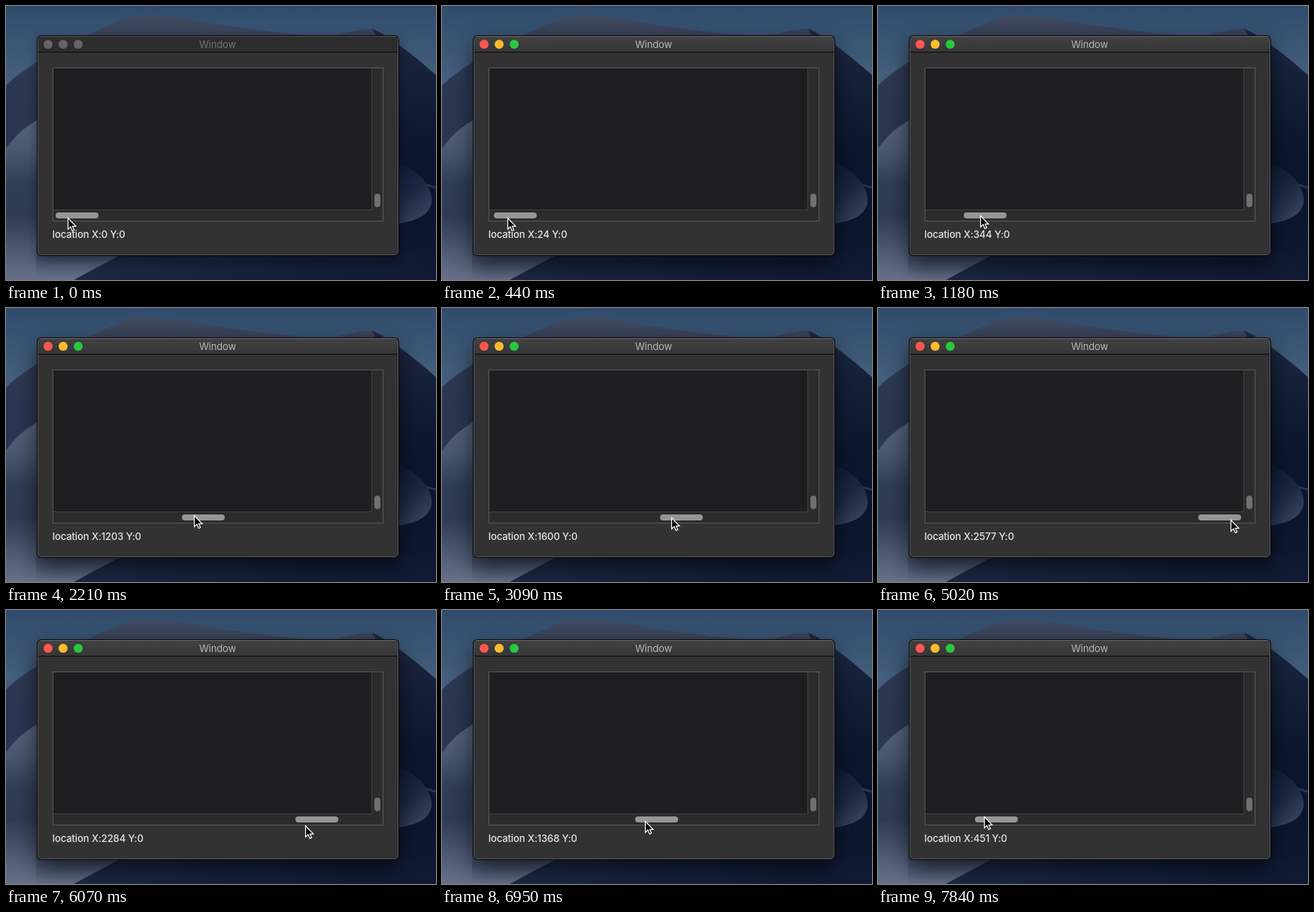
Write an HTML page with a canvas that moves like this. It is 572 px wide and 365 px high and loops after 7.99 s.

```html
<!DOCTYPE html>
<html lang="en">
<head>
<meta charset="utf-8">
<title>Scroll location</title>
<style>
html, body { margin: 0; width: 100%; height: 100%; overflow: hidden; background: #101a30; }
canvas { display: block; }
</style>
</head>
<body>
<canvas id="stage" width="572" height="365"></canvas>
<script>
const W = 572, H = 365, LOOP = 7990, STEP = 147.9;
const TRACK = 66, RATIO = 0.1397;
const ctx = document.getElementById('stage').getContext('2d');

// Drag poses, linear in between: step, scroll, cursor x, cursor y.
const poses = [
  [1, 0, 82, 282],
  [4, 36, 89, 282],
  [8, 344, 136, 279],
  [15, 1203, 250, 276],
  [26, 2076, 372, 283],
  [31, 2577, 450, 282],
  [36, 2577, 482, 282],
  [37, 2577, 482, 282],
  [41, 2284, 398, 287],
  [53, 451, 141, 275]
];

function poseAt(step) {
  const i = Math.max(1, poses.findIndex(p => step <= p[0]));
  const a = poses[i - 1], b = poses[i];
  const k = Math.max(0, (step - a[0]) / (b[0] - a[0]));
  return a.map((v, j) => Math.round(v + (b[j] - v) * k)).slice(1);
}

function gradient(c, x0, y0, x1, y1, ...colors) {
  const g = c.createLinearGradient(x0, y0, x1, y1);
  colors.forEach((col, i) => g.addColorStop(i / (colors.length - 1), col));
  return g;
}

function fillPath(c, d, style) {
  c.fillStyle = style;
  c.fill(new Path2D(d));
}

function strokePath(c, d, style, width = 1) {
  c.strokeStyle = style;
  c.lineWidth = width;
  c.stroke(new Path2D(d));
}

function box(c, x, y, w, h, color, r = 0) {
  c.fillStyle = color;
  c.beginPath();
  c.roundRect(x, y, w, h, r);
  c.fill();
}

function text(c, str, x, y, color, weight, align = 'left') {
  c.font = `${weight} 13px Inter, "Open Sans", sans-serif`;
  c.letterSpacing = '-0.1px';
  c.textAlign = align;
  c.fillStyle = color;
  c.fillText(str, x, y);
}

function drawDesert(c) {
  box(c, 0, 0, W, H, gradient(c, 0, 0, 0, 100, '#304b6c', '#3a5675', '#465f7e'));

  // far dune, then its shaded right flank
  const ridge = 'M0 106C22 84 60 62 112 37C142 24 165 12 186 12C225 13 260 22 313 29C350 34 398 41 440 38C460 34 474 30 487 30';
  fillPath(c, ridge + 'L572 96V365H0Z', gradient(c, 0, 10, 0, 140, '#414b60', '#323c53', '#2c3853', '#2a3652'));
  fillPath(c, 'M487 30C510 40 545 68 572 92V365H440C500 250 520 90 487 30Z',
    gradient(c, 0, 30, 0, 365, '#1d2943', '#131e38', '#0b152d', '#0b152e', '#101a34'));
  strokePath(c, 'M522 222C540 232 556 238 572 242', 'rgba(64,84,124,.5)', 3);

  // near dune on the left: pale crest, hollow, pale foot
  fillPath(c, 'M0 190C14 170 28 158 60 142V365H0Z',
    gradient(c, 0, 150, 0, 365, '#56637c', '#4a5771', '#303d57', '#2f3b55', '#4a5670', '#667189'));

  // foreground: shaded right side, pale left side
  fillPath(c, 'M40 318L540 330L572 365H40Z',
    gradient(c, 90, 0, W, 0, '#1c2844', '#17233d', '#121d37', '#0f1932'));
  fillPath(c, 'M0 318H180C150 332 118 350 90 365H0Z',
    gradient(c, 0, 318, 0, 365, 'rgba(74,86,112,.5)', '#667189'));

  // rounded lobe on the right
  fillPath(c, 'M500 205C532 206 561 228 566 254C569 276 548 291 500 291Z',
    gradient(c, 515, 215, 566, 280, '#0f1a34', '#1b2743', '#3a4661'));
}

function drawWindow(c, active) {
  c.save();
  c.shadowColor = active ? 'rgba(0,0,0,.6)' : 'rgba(0,0,0,.4)';
  c.shadowBlur = active ? 30 : 16;
  c.shadowOffsetY = active ? 12 : 6;
  box(c, 41, 39, 482, 294, '#060708', 6);
  c.restore();
  box(c, 42, 40, 480, 292, '#555557', 5);
  box(c, 43, 41, 478, 290, '#323233', 4);
  box(c, 43, 41, 478, 20, active ? gradient(c, 0, 41, 0, 61, '#414142', '#363637') : '#2d2d2e', [4, 4, 0, 0]);
  if (active) box(c, 46, 40, 472, 1, '#6a6a6b');
  box(c, 43, 61, 478, 1, '#0c0c0d');

  ['#ff5750', '#fdbc2e', '#28c840'].forEach((color, i) => {
    box(c, 50 + i * 20, 45, 12, 12, active ? color : '#646465', 6);
  });
  text(c, 'Window', 281.5, 56, active ? '#b7b7b7' : '#737374', 400, 'center');

  box(c, 62, 82, 440, 205, '#58585a');
  box(c, 63, 83, 438, 203, '#2b2b2c');
  box(c, 63, 83, 423, 188, '#1e1e20');
  box(c, 486, 83, 1, 189, '#404041');
  box(c, 63, 271, 424, 1, '#404041');
  box(c, 490, 250, 8, 18, '#707071', 4);
}

function layer(active) {
  const el = document.createElement('canvas');
  el.width = W;
  el.height = H;
  const c = el.getContext('2d');
  drawDesert(c);
  drawWindow(c, active);
  return el;
}

const idle = layer(false), focused = layer(true);
const arrow = 'M.5 .5V15.3L3.9 12.1L6.2 17.5L8.6 16.5L6.4 11.3H10.9Z';

function drawCursor(x, y) {
  ctx.save();
  ctx.translate(x, y);
  fillPath(ctx, arrow, '#000');
  strokePath(ctx, arrow, '#fff', 1.2);
  ctx.restore();
}

function render(now) {
  const step = Math.min(53, Math.floor((now % LOOP + 12) / STEP));
  const [scroll, x, y] = poseAt(step);
  ctx.drawImage(step < 1 ? idle : focused, 0, 0);
  box(ctx, Math.round(TRACK + scroll * RATIO), 275, 57, 8, '#969697', 4);
  text(ctx, `location X:${scroll} Y:0`, 61.8, 309, '#e6e6e6', 500);
  drawCursor(x, y);
}

function tick(now) {
  render(now);
  requestAnimationFrame(tick);
}
render(0);
requestAnimationFrame(tick);
</script>
</body>
</html>
```
